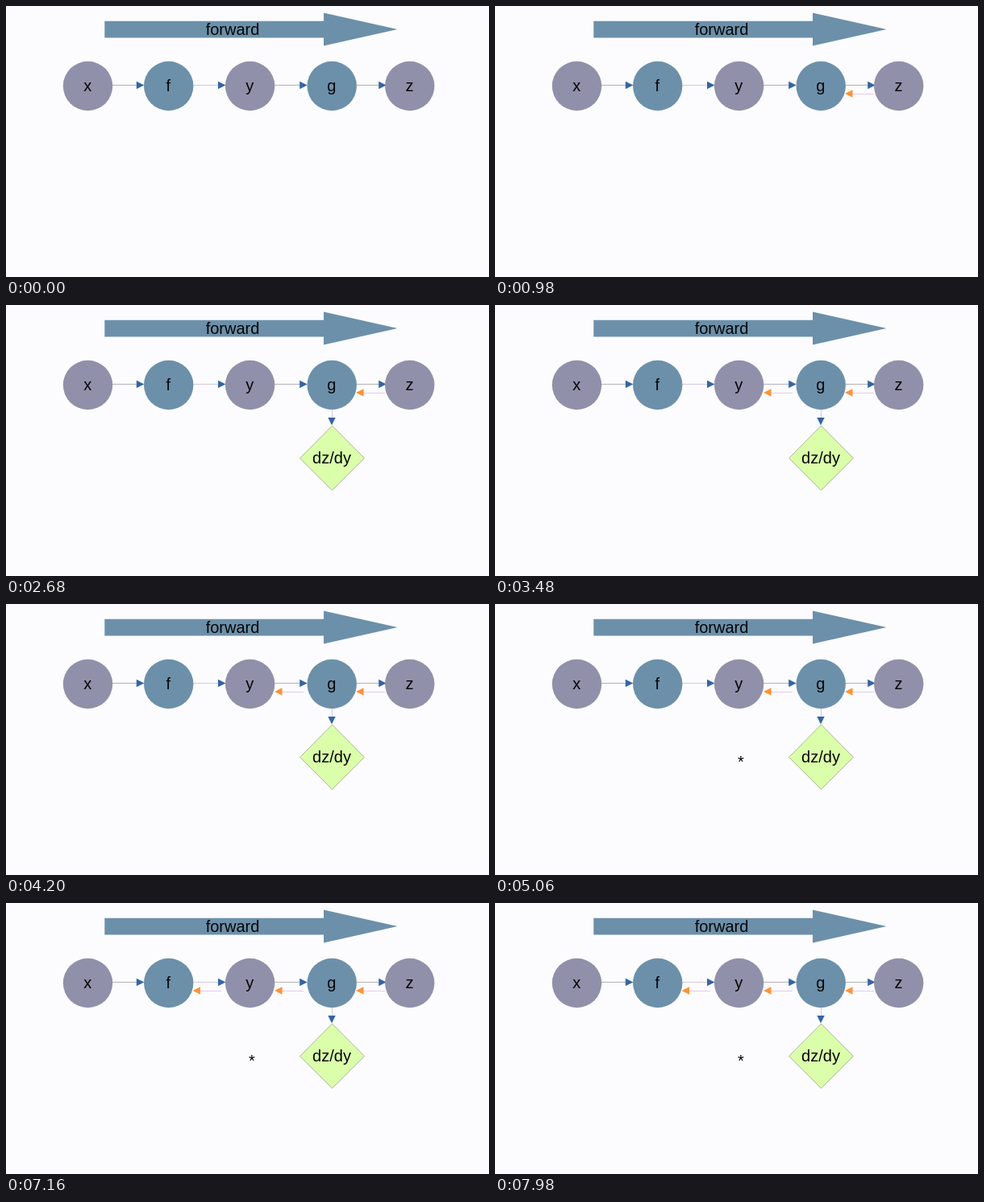
An HTML page that plays this animation: 599x337 px, repeating every 8000 ms.

```html
<!DOCTYPE html>
<html lang="en">
<head>
<meta charset="utf-8">
<title>Chain rule</title>
<style>
  html, body { margin: 0; width: 100%; height: 100%; overflow: hidden; background: #fcfcfe; }
  svg { display: block; width: 599px; height: 337px; }
  text { font: 20px "Liberation Sans", Arial, sans-serif; text-anchor: middle; fill: #050505; }
  .value { fill: #9190aa; }
  .function { fill: #6c90aa; }
  .edge { stroke: #b3b0b3; }
  .soft { stroke: #d0c8e4; }
  .back { stroke: #e6c9ec; }
  .head { fill: #3465a4; }
  .back-head { fill: #ff9233; }
</style>
</head>
<body>
<svg id="stage" viewBox="0 0 599 337"></svg>
<script>
const LOOP = 8000;
const stage = document.getElementById("stage");

const label = (text, x, y) => `<text x="${x}" y="${y}">${text}</text>`;

const node = (text, x, kind) =>
  `<circle class="${kind}" cx="${x}" cy="99.5" r="30.7"/>` + label(text, x - 0.3, 106);

const forwardEdge = (from, tip, line = "edge") =>
  `<path class="${line}" d="M${from} 98.5H${tip - 9}"/>
   <path class="head" d="M${tip} 98.5l-9.5 -4.7v9.4z"/>`;

const backwardEdge = (from, tip) =>
  `<path class="back" d="M${from} 109.5H${tip + 9}"/>
   <path class="back-head" d="M${tip} 109l9.5 -4.7v9.4z"/>`;

const derivative =
  `<path class="soft" d="M404.5 130V141"/>
   <path class="head" d="M404 149.5l-4.7 -9.5h9.4z"/>
   <path fill="#dafeaa" stroke="#aeb6a4" d="M404.5 150L444.5 190.5L404.5 230.5L364.5 190.5Z"/>` +
  label("dz/dy", 404, 197);

// Parts that appear one after another, with their start times in ms.
const steps = [
  [20, backwardEdge(470, 434)],
  [1660, derivative],
  [3360, backwardEdge(369, 333)],
  [5040, label("*", 305, 203)],
  [6720, backwardEdge(267, 231.5)]
];

stage.innerHTML =
  `<path class="function" d="M122.3 18.8H394V8.5L485.5 29L394 49.5V39.5H122.3Z"/>` +
  label("forward", 281, 36) +
  forwardEdge(132, 171.3) +
  forwardEdge(232, 272.5, "soft") +
  forwardEdge(333, 373.7) +
  forwardEdge(435, 471.7) +
  node("x", 101.5, "value") +
  node("f", 201.7, "function") +
  node("y", 302.6, "value") +
  node("g", 404.2, "function") +
  node("z", 500.7, "value") +
  steps.map(([, shape]) => `<g class="step">${shape}</g>`).join("");

const groups = stage.querySelectorAll(".step");
const start = performance.now();

function draw(now) {
  const time = Math.max(0, now - start) % LOOP;
  steps.forEach(([begin], i) => {
    groups[i].style.visibility = time >= begin ? "visible" : "hidden";
  });
  requestAnimationFrame(draw);
}
draw(start);
</script>
</body>
</html>
```
